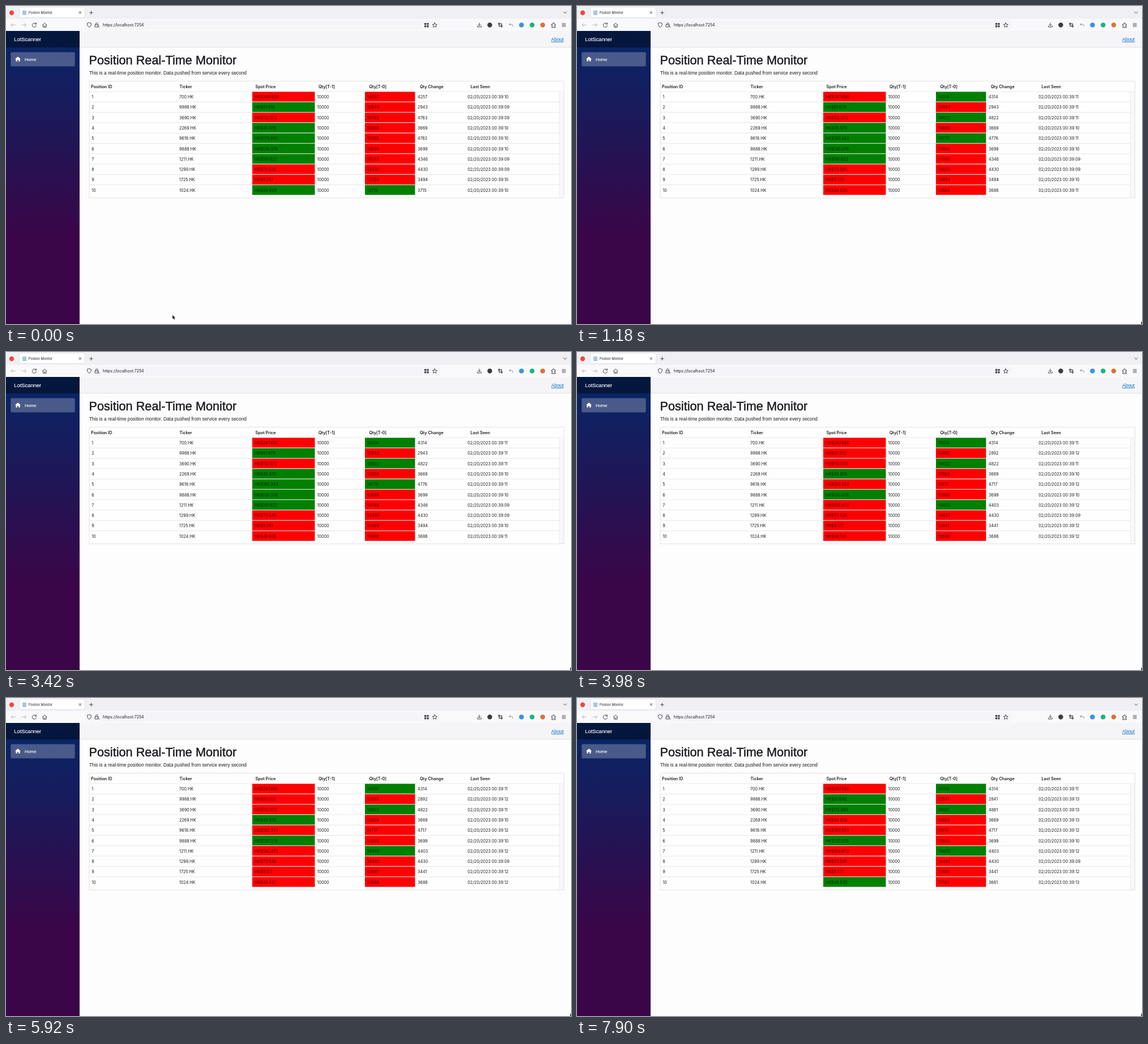
These frames come from a looping animation (998x561 px, 8 s). An HTML page:

```html
<!DOCTYPE html>
<html lang="en">
<head>
<meta charset="utf-8">
<title>Postion Monitor</title>
<style>
  html, body { margin: 0; width: 100%; height: 100%; overflow: hidden; background: #fdfdfd; }
  svg { display: block; width: 998px; height: 561px; }
  text { font-family: "Liberation Sans", Arial, sans-serif; fill: #1b1b20; white-space: pre; }
  .ui, .grid text { font-family: Inter, "Open Sans", sans-serif; }
  .grid text { font-size: 7.2px; }
  .grid .head { font-weight: 600; font-size: 7.28px; }
  .grid .tinted { fill: #000; fill-opacity: .68; }
  .icon { fill: none; stroke: #45454c; stroke-width: 1; stroke-linecap: round; stroke-linejoin: round; }
  .off { stroke: #b9b9be; }
</style>
</head>
<body>
<svg viewBox="0 0 998 561">
  <defs>
    <linearGradient id="side" x2="0" y2="1">
      <stop stop-color="#052767"/><stop offset=".7" stop-color="#3a0647"/>
    </linearGradient>
  </defs>

  <!-- browser -->
  <rect width="998" height="23" fill="#f0f0f4"/>
  <rect y="22.5" width="998" height="21.5" fill="#f9f9fb"/>
  <rect x="140" y="25" width="626" height="17" rx="2" fill="#f5f5f9"/>
  <rect x="24" y="2" width="115.500" height="18.500" rx="2" fill="#fff" stroke="#d3d3da" stroke-width=".6"/>
  <circle cx="10" cy="12" r="4.2" fill="#f0483e"/>
  <rect x="29" y="8" width="7" height="8" fill="#a9c6dc"/>
  <text class="ui" x="40" y="14" font-size="5.65">Postion Monitor</text>
  <text class="ui" x="171" y="36.300" font-size="7">https://localhost:7254</text>
  <g class="icon">
    <path d="M129 9.700l3.600 3.600m0-3.600l-3.600 3.600M150.500 9v5.600M147.700 11.800h5.600M984.800 10.300l2.700 2.600 2.700-2.600"/>
    <path class="off" d="M16.500 33.500h-7.500m3-3l-3 3 3 3M28 33.500h7.500m-3-3l3 3-3 3"/>
    <path d="M53 31.500a3.700 3.700 0 1 0 .6 3.200M53.400 29.700v2.300h-2.400"/>
    <path d="M64.600 33.500l3.700-3.400 3.700 3.400M65.600 33v4.300h5.400V33M68.300 37v-2.300"/>
    <path d="M147 29.500l3.500 1.200c0 3.500-1 5.500-3.500 6.800-2.500-1.300-3.500-3.300-3.500-6.800z"/>
    <path d="M158.500 33v-1.500a1.800 1.800 0 0 1 3.600 0v1.500M157.500 33h5.500v4h-5.500zM162.500 35l2.500 2.500"/>
    <path d="M757.300 29.500l1.200 2.700 2.900.3-2.200 1.900.7 2.900-2.600-1.500-2.600 1.500.7-2.900-2.200-1.900 2.900-.3z"/>
    <path d="M836 29.800v5m-2.200-2.200l2.200 2.200 2.200-2.200M832.600 35v2h6.800v-2"/>
    <path stroke-width="1.300" d="M871 29.500v6h6M869.500 31.500h6v6"/>
    <path stroke="#8f9199" d="M891 30.500l-2 2 2 2M889.200 32.500h4q2.500 0 2.300 3.500"/>
    <path d="M964 32h2v-1.200a1.200 1.200 0 0 1 2.400 0V32h2v2.200h-1a1 1 0 0 0 0 2h1V38H964v-1.800h.5a1 1 0 0 0 0-2H964z"/>
    <path d="M982.300 31h6M982.300 33.500h6M982.300 36h6"/>
  </g>
  <path fill="#45454c" d="M739 30h3.300v3.200h-3.300zM743.400 30h3.300v3.200h-3.300zM739 34.200h3.300v3.200h-3.300zM743.400 34.200h3.300v3.200h-3.300z"/>
  <circle cx="854.500" cy="33.500" r="4.200" fill="#3b3b42"/>
  <circle cx="910.500" cy="33.500" r="4.300" fill="#3c92e6"/>
  <circle cx="929.300" cy="33.500" r="4.300" fill="#15b67c"/>
  <circle cx="948" cy="33.500" r="4.200" fill="#de7330"/>

  <!-- page frame -->
  <rect x="130" y="44" width="868" height="29" fill="#f5f5f8"/>
  <path d="M130 72.700H998" stroke="#d6d5d8" stroke-width=".7"/>
  <rect y="44" width="130" height="517" fill="url(#side)"/>
  <rect y="44" width="130" height="29" fill="#000" fill-opacity=".4"/>
  <rect x="8.300" y="81.500" width="113.400" height="25" rx="2" fill="#fff" fill-opacity=".25"/>
  <path d="M21 89.300l5 4.500h-1.400v4h-2.500v-2.700h-2.200v2.700h-2.500v-4H16z" fill="#fff"/>
  <text x="14.300" y="62.100" font-size="9.350" style="fill:#fff" stroke="#fff" stroke-width=".15">LotScanner</text>
  <text x="33" y="96.600" font-size="7.700" style="fill:#fff" stroke="#fff" stroke-width=".15">Home</text>
  <text x="963" y="62" font-size="8.500" style="fill:#0070c4" text-decoration="underline">About</text>
  <text x="146.500" y="103" font-size="21.700" stroke="#1b1b20" stroke-width=".45">Position Real-Time Monitor</text>
  <text x="146.700" y="121" font-size="8.350">This is a real-time position monitor. Data pushed from service every second</text>

  <g class="grid">
    <rect x="147" y="132.700" width="838.500" height="205.600" fill="#fefefe" stroke="#dcdce0" stroke-width=".8"/>
    <rect x="977.500" y="151" width="7.600" height="187" fill="#f8f8fa" stroke="#e4e4e8" stroke-width=".6"/>
    <g id="rows"></g>
  </g>
  <path id="cursor" d="M0 0v7.600l1.800-1.600 1.300 2.800 1.300-.6-1.200-2.700h2.400z" fill="#000" stroke="#fff" stroke-width=".5"/>
</svg>
<script>
const LOOP = 8000, TOP = 151, PITCH = 18.28;
const HEADS = ["Position ID", "Ticker", "Spot Price", "Qty[T-1]", "Qty[T-0]", "Qty Change", "Last Seen"];
const HEAD_X = [150, 306.5, 440.5, 552, 641.5, 731, 820.5];
const CELL_X = [151.3, 306, 439, 549.5, 638, 727, 815.3];
const TINT = { r: "#fe0000", g: "#008000" };

// ticker, trend + price, trend + quantity change, second last seen
const START = `700 r289.628 r4257 10
9988 g81.516 r2943 09
3690 r112.072 r4763 09
2269 g45.976 r3669 10
9618 g179.983 r4762 10
9888 g130.376 r3699 10
1211 g191.622 r4346 09
1299 r73.546 r4430 09
1725 r9.251 r3494 10
1024 g46.929 g3715 10`.split("\n").map(s => s.split(" "));

// each push: time in ms, second, then the rows it alters
const PUSHES = [
  [700, "11", { 1: "r287.690 g4314", 2: "g81.679 r2943", 3: "r112.072 g4822", 5: "g180.343 g4776", 10: "r46.835 r3688" }],
  [3780, "12", { 2: "r81.352 r2892", 5: "r180.343 r4717", 7: "r190.472 g4403", 9: "r9.177 r3441", 10: "r46.741 r3688" }],
  [7000, "13", { 2: "g81.640 r2841", 3: "g112.898 g4881", 4: "r45.608 r3669", 10: "g46.835 r3661" }]
];

const states = [START];
for (const [, sec, changes] of PUSHES)
  states.push(states.at(-1).map((row, i) =>
    changes[i + 1] ? [row[0], ...changes[i + 1].split(" "), sec] : row));

const label = (x, y, s, cls = "") => `<text class="${cls}" x="${x}" y="${y}">${s}</text>`;
const tint = (x, y, w, trend) =>
  `<rect x="${x}" y="${y + .4}" width="${w}" height="${PITCH - 1}" fill="${TINT[trend]}"/>`;
const rule = y => `<path d="M147 ${y}H977.500" stroke="#dedee2" stroke-width=".7"/>`;

function drawRow([ticker, price, change, sec], i) {
  const y = TOP + i * PITCH, delta = change.slice(1);
  const cells = [i + 1, ticker + ".HK", "HK$" + price.slice(1), 10000, 10000 + +delta, delta, "02/20/2023 00:39:" + sec];
  return rule(y) + tint(435, y, 110.5, price[0]) + tint(634, y, 88.5, change[0]) +
    cells.map((s, c) => label(CELL_X[c], y + 12.1, s, c == 2 || c == 4 ? "tinted" : "")).join("");
}

const heads = HEADS.map((s, c) => label(HEAD_X[c], 144.5, s, "head")).join("");
const rows = document.getElementById("rows"), cursor = document.getElementById("cursor");
let shown = -1;

function frame(now) {
  const t = now % LOOP;
  const state = PUSHES.filter(p => t >= p[0]).length;
  if (state != shown) {
    rows.innerHTML = heads + states[state].map(drawRow).join("");
    shown = state;
  }
  // the pointer sweeps to the lower right edge and rests there
  const p = Math.min(1, Math.max(0, (t - 20) / 260));
  const x = t < 700 ? 294 + 687 * p * p * (3 - 2 * p) : 996.5;
  cursor.setAttribute("transform", `translate(${x} ${545 + 11 * p})`);
  requestAnimationFrame(frame);
}
frame(0);
</script>
</body>
</html>
```
